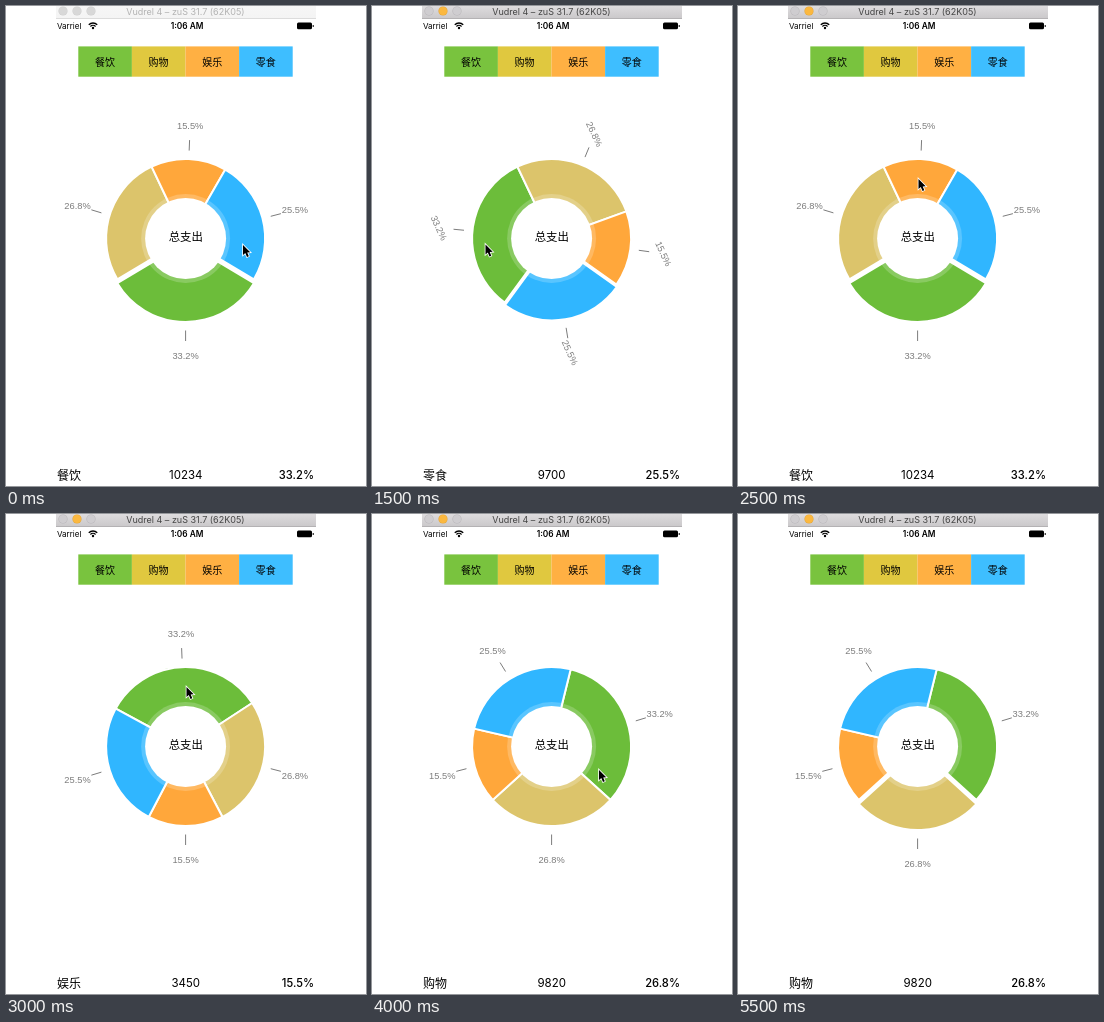
Animation, 360 px wide and 480 px high, one loop 5750 ms. Source, as an HTML page with a canvas:

```html
<!DOCTYPE html>
<html lang="zh">
<head>
<meta charset="utf-8">
<style>
  html, body { margin: 0; width: 360px; height: 480px; overflow: hidden; background: #fff; }
  canvas { display: block; }
</style>
</head>
<body>
<canvas width="360" height="480"></canvas>
<script>
const ctx = document.querySelector('canvas').getContext('2d');
const LOOP = 5750, STEP = 250, TURN = 300;
const CENTER = [179.6, 232.5], RADIUS = 79.5, POP = 4;
const UI = 'Inter, "Noto Sans CJK SC", "Noto Sans CJK", sans-serif';

const items = [
  { name: '餐饮', amount: 10234, percent: 33.2, color: '#6cbd3a', key: '#79c33e' },
  { name: '购物', amount: 9820, percent: 26.8, color: '#dcc46b', key: '#e0c83f' },
  { name: '娱乐', amount: 3450, percent: 15.5, color: '#ffa73b', key: '#ffb043' },
  { name: '零食', amount: 9700, percent: 25.5, color: '#30b6ff', key: '#3ebeff' }
];
const total = items.reduce((sum, item) => sum + item.percent, 0);
let angle = 0;
for (const item of items) {
  item.sweep = item.percent / total * 2 * Math.PI;
  item.mid = angle + item.sweep / 2;
  angle += item.sweep;
}

const spins = [
  { start: -TURN, item: 0, popAt: 0 },
  { start: 100, item: 3, popAt: 1000 },
  { start: 1437, item: 0, popAt: 2000 },
  { start: 2600, item: 2, popAt: 3500 },
  { start: 3600, item: 1, popAt: 4500 }
];
const cursorStops = [
  [0, 237, 239], [1000, 113.5, 238.5], [2250, 180.5, 173], [3500, 227, 256],
  [4750, 245, 337], [5000, 275, 332], [5500, -50, -50]
];

const easeInOut = p => p < .5 ? 2 * p * p : 1 - 2 * (1 - p) ** 2;
const easeOut = p => 1 - (1 - p) ** 2;
const wrap = a => Math.atan2(Math.sin(a), Math.cos(a));

function text(str, x, y, size, color = '#000', align = 'center', font = UI, weight = 400) {
  ctx.font = `${weight} ${size}px ${font}`;
  ctx.textAlign = align;
  ctx.textBaseline = 'alphabetic';
  ctx.fillStyle = color;
  ctx.fillText(str, x, y);
}

function disc(x, y, r, color) {
  ctx.fillStyle = color;
  ctx.beginPath();
  ctx.arc(x, y, r, 0, 2 * Math.PI);
  ctx.fill();
}

function drawTitleBar(active) {
  const fill = ctx.createLinearGradient(0, 0, 0, 12);
  fill.addColorStop(0, active ? '#dedcde' : '#f6f6f6');
  fill.addColorStop(1, active ? '#cbc9cb' : '#f4f4f4');
  ctx.fillStyle = fill;
  ctx.fillRect(50, 0, 260, 12);
  ctx.fillStyle = active ? '#b4b2b4' : '#dcdcdc';
  ctx.fillRect(50, 12, 260, 1);
  const rim = active ? '#b9b7ba' : '#d0d0d0', face = active ? '#cfcdd0' : '#d8d8d8';
  for (let i = 0; i < 3; i++) {
    const lit = active && i === 1;
    disc(57 + 14 * i, 5, 4.6, lit ? '#e3a63c' : rim);
    disc(57 + 14 * i, 5, 4, lit ? '#fbb83f' : face);
  }
  text('Vudrel 4 – zuS 31.7 (62K05)', 179.4, 9, 9, active ? '#444' : '#b2b2b2');
}

function drawStatusBar() {
  text('Varriel', 51, 23, 8, '#000', 'left');
  text('1:06 AM', 181, 23, 8.3, '#000', 'center', UI, 600);
  ctx.strokeStyle = '#000';
  ctx.lineWidth = 1.3;
  for (const r of [3.6, 6]) {
    ctx.beginPath();
    ctx.arc(87, 23, r, -Math.PI * .75, -Math.PI * .25);
    ctx.stroke();
  }
  disc(87, 22, 1.2, '#000');
  ctx.beginPath();
  ctx.roundRect(291, 16.6, 15, 6.6, 1.5);
  ctx.fill();
  ctx.fillRect(306.7, 19, 1, 2);
}

function drawLegend() {
  items.forEach((item, i) => {
    ctx.fillStyle = item.key;
    ctx.fillRect(72.3 + 53.6 * i, 40.4, 53.6, 30.3);
    text(item.name, 99 + 53.6 * i, 59.7, 10);
  });
}

function drawSlice(item, mid, shift) {
  const x = shift * Math.cos(mid), y = shift * Math.sin(mid);
  ctx.beginPath();
  ctx.moveTo(x, y);
  ctx.arc(x, y, RADIUS, mid - item.sweep / 2, mid + item.sweep / 2);
  ctx.closePath();
  ctx.fillStyle = item.color;
  ctx.fill();
  ctx.strokeStyle = '#fff';
  ctx.lineWidth = 2;
  ctx.stroke();
}

function drawLabel(item, mid, shift, tilt) {
  const cos = Math.cos(mid), sin = Math.sin(mid);
  ctx.beginPath();
  ctx.moveTo((88 + shift) * cos, (88 + shift) * sin);
  ctx.lineTo((98.5 + shift) * cos, (98.5 + shift) * sin);
  ctx.strokeStyle = '#7c7c7c';
  ctx.lineWidth = 1;
  ctx.stroke();
  ctx.save();
  ctx.translate((113 + shift) * cos, (113 + shift) * sin);
  ctx.rotate(tilt);
  text(item.percent + '%', 0, 3.5, 9.3, '#7c7c7c', 'center', '"Liberation Sans", sans-serif');
  ctx.restore();
}

function drawPie(t, spin, last) {
  const p = Math.min(1, (t - spin.start) / TURN);
  const rest = Math.PI / 2 - items[spin.item].mid;
  const offset = wrap(items[spin.item].mid - items[last.item].mid);
  const turn = rest + offset * (1 - easeInOut(p));
  const tilt = offset * (1 - easeOut(p));
  const shiftOf = i =>
    i === spin.item && t >= spin.popAt ? POP :
    i === last.item && p < 1 ? POP * (1 - easeOut(p)) : 0;

  ctx.save();
  ctx.translate(...CENTER);
  items.forEach((item, i) => drawSlice(item, item.mid + turn, shiftOf(i)));
  disc(0, 0, 44.5, 'rgba(255,255,255,.2)');
  disc(0, 0, 40.5, '#fff');
  items.forEach((item, i) => drawLabel(item, item.mid + turn, shiftOf(i), tilt));
  ctx.restore();
  text('总支出', 179.8, 235.2, 11.4);

  const shown = items[(p < 1 ? last : spin).item];
  text(shown.name, 51, 473.8, 12, '#000', 'left');
  text(shown.amount, 179.7, 473, 11.5);
  text(shown.percent + '%', 308, 473, 11.2, '#000', 'right', UI, 500);
}

function drawCursor(x, y) {
  ctx.save();
  ctx.translate(x, y);
  ctx.beginPath();
  [[0, 0], [0, 10], [2.3, 8], [4, 12], [5.8, 11.2], [4.2, 7.4], [7.2, 7.2]]
    .forEach(point => ctx.lineTo(...point));
  ctx.closePath();
  ctx.strokeStyle = '#fff';
  ctx.lineWidth = 1.6;
  ctx.stroke();
  ctx.fillStyle = '#000';
  ctx.fill();
  ctx.restore();
}

const begin = performance.now();
function frame() {
  const elapsed = Math.max(0, performance.now() - begin) % LOOP;
  const t = Math.floor(elapsed / STEP) * STEP;
  const n = spins.findLastIndex(s => s.start <= t);

  ctx.fillStyle = '#fff';
  ctx.fillRect(0, 0, 360, 480);
  drawTitleBar(t >= 500);
  drawStatusBar();
  drawLegend();
  drawPie(t, spins[n], spins[Math.max(0, n - 1)]);
  const [, x, y] = cursorStops.findLast(stop => stop[0] <= t);
  drawCursor(x, y);
  requestAnimationFrame(frame);
}
frame();
</script>
</body>
</html>
```
